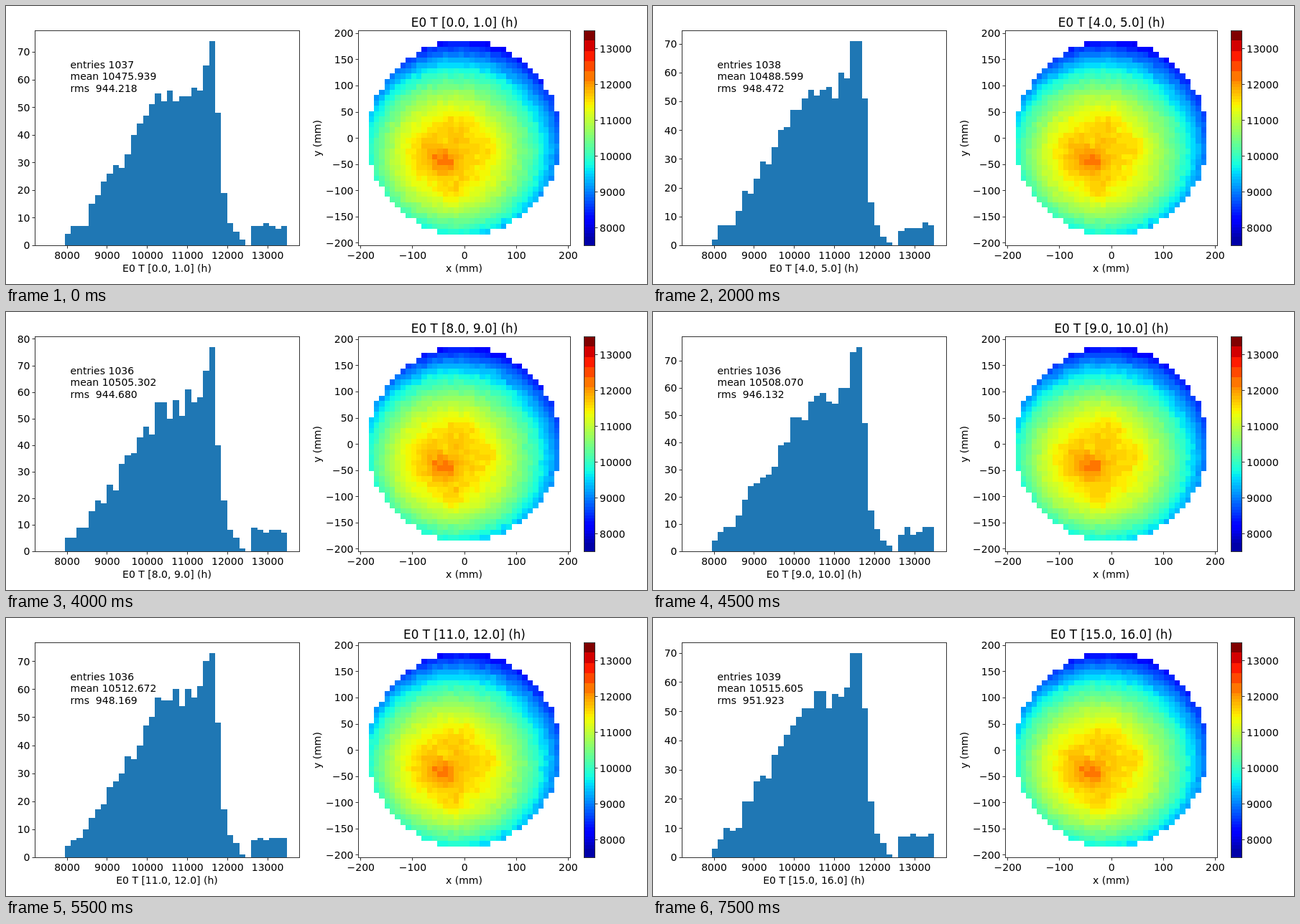
Animation of 892x388 px, one loop 8000 ms. Source, as an HTML page with a canvas:

```html
<!DOCTYPE html>
<html lang="en">
<head>
<meta charset="utf-8">
<title>Hourly charge histogram and map</title>
<style>
  html, body { margin: 0; width: 100%; height: 100%; overflow: hidden; background: #fff; }
  canvas { display: block; }
</style>
</head>
<body>
<canvas id="stage" width="892" height="388"></canvas>
<script>
const ctx = document.getElementById('stage').getContext('2d');
const STEP = 500, HOURS = 16, BINS = 40, CELLS = 40;
const TOP = 34, BOTTOM = 334;
const HIST = { x: 40, w: 368 };
const MAP = { x: 490, w: 295 };
const BAR = { x: 804, w: 15 };
const INK = '#333';
const FONT = '"DejaVu Sans", sans-serif';

const lerp = (a, b, t) => a + (b - a) * t;
const clamp = v => Math.max(0, Math.min(1, v));

// Seeded noise, roughly normal with unit spread
function rand(n) {
  const v = Math.sin(n * 12.9898 + 4.137) * 43758.5453;
  return v - Math.floor(v);
}
const noise = n => (rand(n) + rand(n + 0.31) + rand(n + 0.67) - 1.5) * 2;

// Value of the row of key points at x, blended linearly column by column
function at(keys, x) {
  let j = keys.findIndex(k => k[0] >= x);
  if (j < 1) j = 1;
  const a = keys[j - 1], b = keys[j];
  const t = clamp((x - a[0]) / (b[0] - a[0]));
  return a.map((v, i) => lerp(v, b[i], t));
}

// hour, entries, mean, rms, peak
const stats = [
  [0, 1037, 10475.939, 944.218, 74],
  [4, 1038, 10488.599, 948.472, 71],
  [6, 1036, 10500.189, 947.713, 76],
  [8, 1036, 10505.302, 944.680, 77],
  [10, 1036, 10510.838, 947.585, 72],
  [13, 1037, 10516.341, 949.337, 76],
  [15, 1039, 10515.605, 951.923, 70]
];

// Slow rise, a sharp peak, then a steep edge
const outline = peak => [
  [2, 0], [4, 7], [6, 9], [8, 18], [12, 30], [16, 46], [18, 53], [25, 58],
  [26, 70], [27, peak], [28, 48], [29, 18], [30, 8], [32, 1], [33, 0]
];

function counts(h, peak) {
  const keys = outline(peak);
  return Array.from({ length: BINS }, (_, i) => {
    const n = at(keys, i)[1];
    if (n === peak) return peak;
    return Math.max(0, Math.min(peak, Math.round(n + 0.4 * Math.sqrt(n) * noise(h * BINS + i))));
  });
}

function jet(value) {
  let t = Math.max(0.032, clamp((value - 7500) / 6000));
  if (t > 16 / 21) t = t >= 20 / 21 ? 1 : (Math.floor(t * 21) + 0.5) / 21;
  else t = (Math.floor(t * 72) + 0.5) / 72;
  const r = t < 0.89 ? (t - 0.35) / 0.31 : 1 - (t - 0.89) / 0.22;
  const g = t < 0.5 ? (t - 0.125) / 0.25 : 1 - (t - 0.64) / 0.27;
  const b = t < 0.3 ? 0.5 + t / 0.22 : 1 - (t - 0.34) / 0.31;
  return 'rgb(' + [r, g, b].map(c => Math.round(clamp(c) * 255)).join(',') + ')';
}

// Local bumps in mm: x, y, height, width
const bumps = [
  [-38, -45, 420, 17], [-65, -25, 170, 24], [-37, -10, -260, 9],
  [50, -20, 220, 13], [-22, -105, 240, 14], [-5, 35, 180, 24]
];
const RIM = 187, CX = -25, CY = -30;

// Falls from an off-centre maximum to a rim level that depends on direction
function charge(x, y) {
  const dx = x - CX, dy = y - CY, d = Math.hypot(dx, dy) || 1;
  const c = dx / d, s = dy / d;
  const along = CX * c + CY * s;
  const reach = -along + Math.sqrt(along * along + RIM * RIM - CX * CX - CY * CY);
  const drop = 2600 + 440 * c + 725 * s - 200 * (c * c - s * s);
  const power = 2.3 - 0.25 * (c + s);
  let v = 11700 - drop * Math.pow(d / reach, power);
  for (const [bx, by, height, w] of bumps) {
    v += height * Math.exp(-((x - bx) ** 2 + (y - by) ** 2) / (2 * w * w));
  }
  return v;
}

function text(str, x, y, align = 'center', size = 14) {
  ctx.font = size + 'px ' + FONT;
  ctx.textAlign = align;
  ctx.fillStyle = '#000';
  ctx.fillText(str, x, y);
}

const label = v => String(v).replace('-', '\u2212');

function frame(box) {
  ctx.strokeStyle = INK;
  ctx.lineWidth = 1;
  ctx.strokeRect(box.x + 0.5, TOP + 0.5, box.w, BOTTOM - TOP);
}

function xTick(x, v) {
  ctx.fillStyle = INK;
  ctx.fillRect(Math.round(x), BOTTOM + 1, 1, 3.5);
  text(label(v), x + 0.5, 353);
}

function yTick(axis, y, v) {
  ctx.fillStyle = INK;
  ctx.fillRect(axis - 3.5, Math.round(y), 3.5, 1);
  text(label(v), axis - 6.5, Math.round(y + 5.5), 'right');
}

function drawHistogram(h, name) {
  const [, entries, mean, rms, top] = at(stats, h);
  const peak = Math.round(top);
  const limit = peak * 1.05;
  const xOf = e => 39.88 + (e - 7200) * 0.05581;
  const yOf = n => 333.9 - 299.6 * n / limit;
  ctx.fillStyle = '#1f77b4';
  counts(h, peak).forEach((n, i) => {
    if (!n) return;
    const x0 = Math.round(xOf(7500 + 150 * i));
    const x1 = Math.round(xOf(7650 + 150 * i));
    const y = Math.round(yOf(n));
    ctx.fillRect(x0, y, x1 - x0, BOTTOM - y);
  });
  frame(HIST);
  for (let e = 8000; e <= 13000; e += 1000) xTick(xOf(e), e);
  for (let n = 0; n <= limit; n += 10) yTick(HIST.x, yOf(n), n);
  text('entries ' + Math.round(entries), 89.5, 87, 'left');
  text('mean ' + mean.toFixed(3), 89.5, 103, 'left');
  text('rms  ' + rms.toFixed(3), 89.5, 120, 'left');
  text(name, 224, 371);
}

function drawMap(h, name) {
  const xOf = i => Math.round(489.8 + i * 7.375);
  const yOf = j => Math.round(34.3 + j * 7.49);
  const mm = 10.23;
  for (let j = 0; j < CELLS; j++) {
    for (let i = 0; i < CELLS; i++) {
      const u = i - 19.5, v = 19.5 - j;
      if (u * u + v * v > 330) continue;
      const id = j * CELLS + i;
      const value = charge(u * mm, v * mm) + 45 * noise(id) + 25 * noise(id + 1700 * (h + 1));
      ctx.fillStyle = jet(value);
      ctx.fillRect(xOf(i), yOf(j), xOf(i + 1) - xOf(i), yOf(j + 1) - yOf(j));
    }
  }
  frame(MAP);
  for (let v = -200; v <= 200; v += 100) xTick(637.6 + v * 0.7215, v);
  for (let v = -200; v <= 200; v += 50) yTick(MAP.x, 184.1 - v * 0.7315, v);
  text(name, 638, 28.5, 'center', 16.8);
  text('x (mm)', 637.5, 371);
  ctx.save();
  ctx.translate(438, 184.5);
  ctx.rotate(-Math.PI / 2);
  text('y (mm)', 0, 0);
  ctx.restore();
}

function drawColorBar() {
  for (let y = TOP; y < BOTTOM; y++) {
    ctx.fillStyle = jet(13500 - (y - TOP + 0.5) * 20);
    ctx.fillRect(BAR.x, y, BAR.w, 1);
  }
  frame(BAR);
  for (let e = 8000; e <= 13000; e += 1000) {
    const y = BOTTOM - (e - 7500) / 20;
    ctx.fillStyle = INK;
    ctx.fillRect(820, Math.round(y), 3.5, 1);
    text(e, 826, Math.round(y + 5.5), 'left');
  }
}

function draw(h) {
  ctx.fillStyle = '#fff';
  ctx.fillRect(0, 0, 892, 388);
  const name = `E0 T [${h.toFixed(1)}, ${(h + 1).toFixed(1)}] (h)`;
  drawHistogram(h, name);
  drawMap(h, name);
  drawColorBar();
}

const start = performance.now();
let shown = -1;
function tick() {
  const h = Math.floor((performance.now() - start) / STEP) % HOURS;
  if (h !== shown) draw(shown = h);
  requestAnimationFrame(tick);
}
tick();
</script>
</body>
</html>
```
